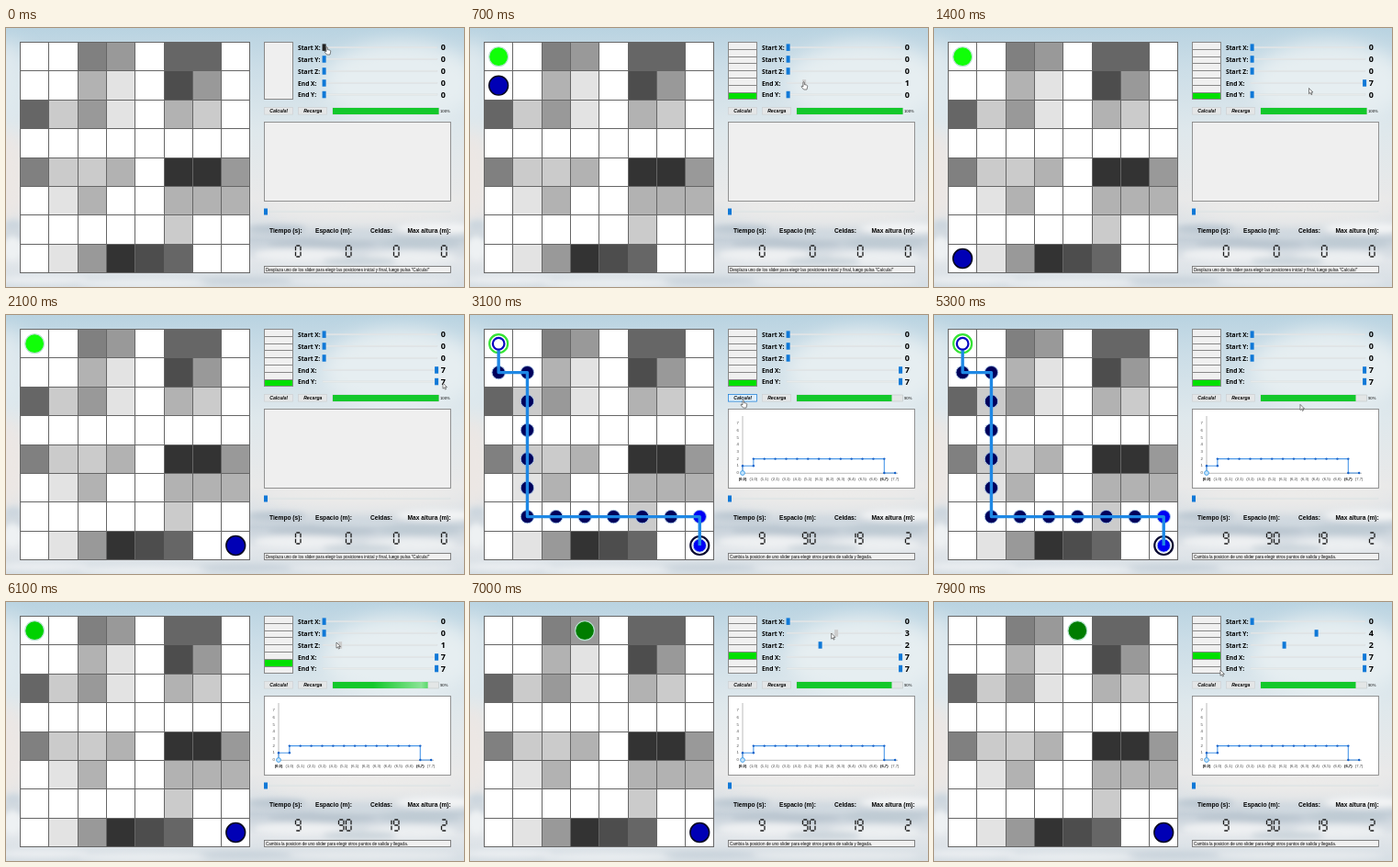
These frames come from a looping animation (499x282 px, 8000 ms). An HTML page:

```html
<!DOCTYPE html>
<html lang="es">
<head>
<meta charset="utf-8">
<style>
  html, body { margin: 0; width: 100%; height: 100%; overflow: hidden; background: #dbe6ec; }
  svg { display: block; width: 100vw; height: 100vh; font-family: "Liberation Sans", Arial, sans-serif; }
  .crisp { shape-rendering: crispEdges; }
</style>
</head>
<body>
<svg id="stage" viewBox="0 0 499 282" preserveAspectRatio="none">
  <defs>
    <linearGradient id="sky" x2="0" y2="1">
      <stop offset="0" stop-color="#b9d3e1"/>
      <stop offset=".15" stop-color="#cbdde7"/>
      <stop offset=".4" stop-color="#dfe8ec"/>
      <stop offset=".66" stop-color="#e9e9e9"/>
      <stop offset=".75" stop-color="#dde2e6"/>
      <stop offset=".82" stop-color="#c6d0d9"/>
      <stop offset=".9" stop-color="#e2e6ea"/>
      <stop offset="1" stop-color="#d6dee4"/>
    </linearGradient>
    <linearGradient id="shine">
      <stop offset="0" stop-color="#fff" stop-opacity="0"/>
      <stop offset=".75" stop-color="#fff" stop-opacity=".5"/>
      <stop offset="1" stop-color="#fff" stop-opacity="0"/>
    </linearGradient>
    <filter id="haze" x="-50%" y="-80%" width="200%" height="260%"><feGaussianBlur stdDeviation="10"/></filter>
    <filter id="soft" x="-50%" y="-80%" width="200%" height="260%"><feGaussianBlur stdDeviation="3"/></filter>
    <clipPath id="bar"><rect x="356" y="87" width="103.5" height="7"/></clipPath>
  </defs>
  <rect width="499" height="282" fill="url(#sky)"/>
  <g id="mist" filter="url(#haze)"></g>
  <g id="clouds" filter="url(#soft)"></g>
  <g id="board" class="crisp"></g>
  <g id="panel"></g>
  <g id="live"></g>
</svg>
<script>
const DURATION = 8000, FRAME = 100;
const CELL_W = 31.3, CELL_H = 31.4, LEFT = 15.5, TOP = 15.5;
const CALC_AT = 2900, CLEAR_AT = 6000, MARKERS_AT = 600;
const BLUE = '#0f78d7';
const byId = id => document.getElementById(id);

const tag = (name, attrs, body = '') =>
  `<${name} ${Object.entries(attrs).map(([k, v]) => `${k}="${v}"`).join(' ')}>${body}</${name}>`;
const rect = (x, y, width, height, fill, more) => tag('rect', { x, y, width, height, fill, ...more });
const circle = (cx, cy, r, fill, more) => tag('circle', { cx, cy, r, fill, ...more });
const ellipses = list => list.map(([cx, cy, rx, ry, fill]) => tag('ellipse', { cx, cy, rx, ry, fill })).join('');
const text = (x, y, size, body, more) => tag('text', { x, y, 'font-size': size, ...more }, body);
const line = (points, stroke, width, more) =>
  tag('polyline', { points: points.join(' '), fill: 'none', stroke, 'stroke-width': width, ...more });
const bold = { 'font-weight': 700 };
const wideBold = { ...bold, 'font-family': "'Open Sans', 'Noto Sans', sans-serif" };
const edge = (stroke, width = 1) => ({ stroke, 'stroke-width': width });

// One digit per cell, higher is darker.
const heights = ['00540660', '00310740', '62410320', '00000000',
                 '52230884', '01300333', '00000200', '01487600'];
const shades = ['#fff', '#e3e3e3', '#cbcbcb', '#b2b2b2', '#999', '#808080', '#666', '#4d4d4d', '#333'];
const colX = col => LEFT + Math.round(col * CELL_W);
const rowY = row => TOP + Math.round(row * CELL_H);
const center = ([row, col]) => [LEFT + (col + .5) * CELL_W, TOP + (row + .5) * CELL_H];

const route = [[0, 0], [1, 0]];
for (let row = 1; row <= 6; row++) route.push([row, 1]);
for (let col = 2; col <= 7; col++) route.push([6, col]);
route.push([7, 7]);

const sliders = [
  { label: 'Start X:', y: 21.2 },
  { label: 'Start Y:', y: 34, from: 6600, to: 7200, end: 4 },
  { label: 'Start Z:', y: 47, from: 5800, to: 6300, end: 2 },
  { label: 'End X:', y: 60, from: 600, to: 1300, end: 7 },
  { label: 'End Y:', y: 72.6, from: 1500, to: 2000, end: 7 }
];

// Time, x, y of the pointer.
const pointer = [
  [0, 349, 21], [200, 347, 35], [600, 347, 58], [700, 363, 59], [1300, 470, 59],
  [1500, 347, 72], [2000, 474, 73], [2100, 476, 74], [2300, 460, 78], [2800, 297, 93],
  [3400, 297, 93], [4300, 477, 176], [4700, 477, 176], [5700, 347, 45], [6000, 359, 44],
  [6100, 360, 44], [6300, 382, 46], [6600, 347, 34], [7200, 417, 34], [7400, 417, 36],
  [7900, 312, 74], [8000, 312, 74]
];

function pointerAt(t) {
  const i = Math.max(1, pointer.findIndex(k => k[0] >= t));
  const a = pointer[i - 1], b = pointer[i], p = (t - a[0]) / (b[0] - a[0]);
  return [a[1] + (b[1] - a[1]) * p, a[2] + (b[2] - a[2]) * p];
}

function sliderValue({ from, to, end }, t) {
  if (!end || t <= from) return 0;
  return Math.round(end * Math.min(1, (t - from) / (to - from)));
}

function drawStatic() {
  byId('mist').innerHTML = ellipses([[0, 60, 25, 45, '#dfe9ee'], [430, 60, 85, 45, '#e6eef1'],
    [0, 160, 25, 50, '#ece7e4'], [390, 198, 110, 12, '#eeecea']]);
  byId('clouds').innerHTML = ellipses([[295, 219, 32, 5, '#bcc8d2'], [380, 226, 45, 5, '#d0d9e0'],
    [470, 218, 45, 6, '#f3f4f5'], [345, 235, 60, 5, '#b9c5cf'], [450, 234, 45, 5, '#becad3'],
    [320, 247, 50, 7, '#eef0f2'], [440, 250, 50, 7, '#eceff1'], [385, 254, 40, 5, '#ccd5dc'],
    [8, 215, 10, 6, '#ccd6de'], [7, 240, 12, 14, '#eef1f3'], [40, 274, 50, 4, '#eceff2'],
    [150, 278, 70, 5, '#e9edf0'], [260, 275, 50, 4, '#c9d3db'], [400, 276, 90, 5, '#e6eaed']]);

  byId('board').innerHTML = heights.map((row, r) => [...row].map((h, c) =>
    rect(colX(c), rowY(r), colX(c + 1) - colX(c), rowY(r + 1) - rowY(r), shades[h], edge('#666'))
  ).join('')).join('');

  let s = '';
  for (const { label, y } of sliders) {
    s += text(318, y + 2.6, 6.7, label, wideBold) + groove(345, y, 125);
  }
  s += button(318, 'Recarga');
  s += groove(283, 200, 201) + rect(281, 196.5, 4, 7, BLUE);
  const heads = [[287, 'Tiempo (s):'], [337, 'Espacio (m):'], [397, 'Celdas:'], [437.5, 'Max altura (m):']];
  s += heads.map(([x, label]) => text(x, 222.5, 6.65, label, bold)).join('');
  byId('panel').innerHTML = s;
}

const groove = (x, y, width) => rect(x, y - .9, width, 1.6, '#e7eaea', edge('#d5dbde', .4));

function button(x, label, hover) {
  return rect(x + .5, 86.5, 31, 7.6, hover ? '#e0effb' : '#e4e6e7', edge(hover ? BLUE : '#cdd1d3', .7)) +
    text(x + 16.3, 92.2, 5.15, label, { ...bold, 'font-style': 'italic', 'text-anchor': 'middle' });
}

// Segments in order: top, upper right, lower right, bottom, lower left, upper left, middle.
const segments = ['M.8 0H4.7', 'M5.5 .8V5.2', 'M5.5 6.8V11.2', 'M.8 12H4.7', 'M0 6.8V11.2', 'M0 .8V5.2', 'M.8 6H4.7'];
const lit = { 0: '012345', 1: '12', 2: '01643', 9: '012356' };
function lcd(right, digits) {
  return [...digits].map((d, i) => tag('path', {
    d: [...lit[d]].map(k => segments[k]).join(''),
    transform: `translate(${right - 5.5 - 8 * (digits.length - 1 - i)} 237)`,
    fill: 'none', ...edge('#1c1c1c', 1.3)
  })).join('');
}

function chart() {
  const px = i => 297 + i * 11.87, py = v => 172 - v * 7.7;
  let s = line([297, 110, 297, 172.3, 466, 172.3], '#777', .5);
  for (let v = 0; v < 8; v++) s += text(293, py(v) + 1, 4.3, v, { 'text-anchor': 'end', fill: '#444' });
  route.forEach((cell, i) => {
    const strong = i === 0 || i === 13;
    s += text(px(i), 180, 4.2, `(${cell})`, { 'text-anchor': 'middle', ...(strong ? bold : { fill: '#333' }) });
  });
  s += line([px(0), py(0), px(0), py(1), px(1), py(1), px(1), py(2),
    px(13), py(2), px(13), py(0), px(14), py(0)], '#4a97e8', 1.1);
  const dot = (i, v) => circle(px(i), py(v), 1.2, '#1560c8');
  s += dot(0, 1) + dot(1, 1) + dot(13, 0) + dot(14, 0);
  for (let i = 1; i <= 13; i++) s += dot(i, 2);
  return s + circle(px(0), py(0), 2.4, '#c9e6fb', edge('#3a9be8', .9));
}

function drawRoute() {
  const points = route.map(center);
  let s = circle(...points[0], 10, '#fff', edge('#35e335', 2.2));
  s += circle(...points[14], 10, '#fff', edge('#050530', 2.2));
  points.slice(1).forEach(([x, y], i) => {
    const fill = i >= 12 ? '#0000f4' : '#00005c';
    s += circle(x, y, 7.2, fill, edge('#a9c5e5', 1));
  });
  s += line(points.flat(), '#1e88e5', 3.4, { 'stroke-linejoin': 'round' });
  return s + circle(...points[0], 6.3, '#fff', edge('#0808c0', 2.2));
}

function drawPointer(t) {
  const [x, y] = pointerAt(t);
  const hand = t < 1400 || (t >= 2700 && t < 3600);
  const d = hand
    ? 'M0 0q1-.8 1.4 .4V2.6L4 3.2q1 .4.7 1.6L4 8H.6L-2 5q0-1 1-.8L0 4.8Z'
    : 'M0 0V6.2L1.5 4.9 2.5 7.1 3.5 6.6 2.5 4.5H4.4Z';
  return tag('path', { d, transform: `translate(${x} ${y})`, fill: '#fff', ...edge('#333', .6) });
}

function progress(t, done) {
  let s = rect(356, 87, 115.5, 7, '#e3e6e6', edge('#bfc5c6', .6));
  s += rect(356, 87, done ? 103.5 : 115.5, 7, '#13c82b');
  const start = [3900, 5600].find(from => t >= from && t < from + 800);
  if (start) {
    s += tag('g', { 'clip-path': 'url(#bar)' },
      rect(330 + (t - start) * .14, 87, 70, 7, 'url(#shine)'));
  }
  return s + text(473, 92, 4.2, done ? '90%' : '100%');
}

function legend(level) {
  const top = i => 15.5 + Math.round(i * 7.8);
  let s = '';
  for (let i = 0; i < 8; i++) {
    s += rect(281.5, top(i), 31, top(i + 1) - top(i), i === 7 - level ? '#00e000' : '#f0f0f0', edge('#888'));
  }
  return tag('g', { class: 'crisp' }, s);
}

function render(t) {
  const values = sliders.map(s => sliderValue(s, t));
  const [startX, startY, startZ, endX, endY] = values;
  const done = t >= CALC_AT, placed = t >= MARKERS_AT;
  let s = '';

  if (done && t < CLEAR_AT) s += drawRoute();
  else if (placed) {
    s += circle(...center([startX, startY]), 10.4, ['#10ff08', '#00d200', '#007d00'][startZ], edge('#b4e0cc', 1.1));
    s += circle(...center([endX, endY]), 10.4, '#0000b5', edge('#080820', 1.5));
  }

  s += placed ? legend(startZ) : rect(281.5, 15.5, 31, 62, '#efefef', edge('#888'));

  sliders.forEach(({ y, from, to }, i) => {
    const held = from && t >= from && t <= to;
    const hover = i === 0 && t < 200;
    s += rect(344.6 + values[i] * 17.5, y - 3.8, 4, 7.5, held ? '#ccc' : hover ? '#222' : BLUE);
    s += text(479, y + 3.2, 9, values[i], { ...wideBold, 'text-anchor': 'end' });
  });

  s += button(281, 'Calcula!', t >= 2700 && t < 3600);
  s += progress(t, done);
  s += rect(281.5, 102.5, 203, 86, done ? '#fff' : '#efefef', edge('#888', .9));
  if (done) s += chart();

  const readings = done ? ['9', '90', '19', '2'] : ['0', '0', '0', '0'];
  s += [321, 376, 428, 480].map((x, i) => lcd(x, readings[i])).join('');
  s += rect(281.5, 259.5, 203, 7, '#f0f0f0', edge('#777', .9));
  s += text(283, 264.7, 4.55, done
    ? 'Cambia la posicion de uno slider para elegir otros puntos de salida y llegada.'
    : 'Desplaza uno de los slider para elegir las posiciones inicial y final, luego pulsa "Calcula!"');
  byId('live').innerHTML = s + drawPointer(t);
}

let shown = -1;
const origin = performance.now();
function tick() {
  const t = Math.floor(((performance.now() - origin) % DURATION) / FRAME) * FRAME;
  if (t !== shown) render(shown = t);
  requestAnimationFrame(tick);
}

drawStatic();
tick();
</script>
</body>
</html>
```
